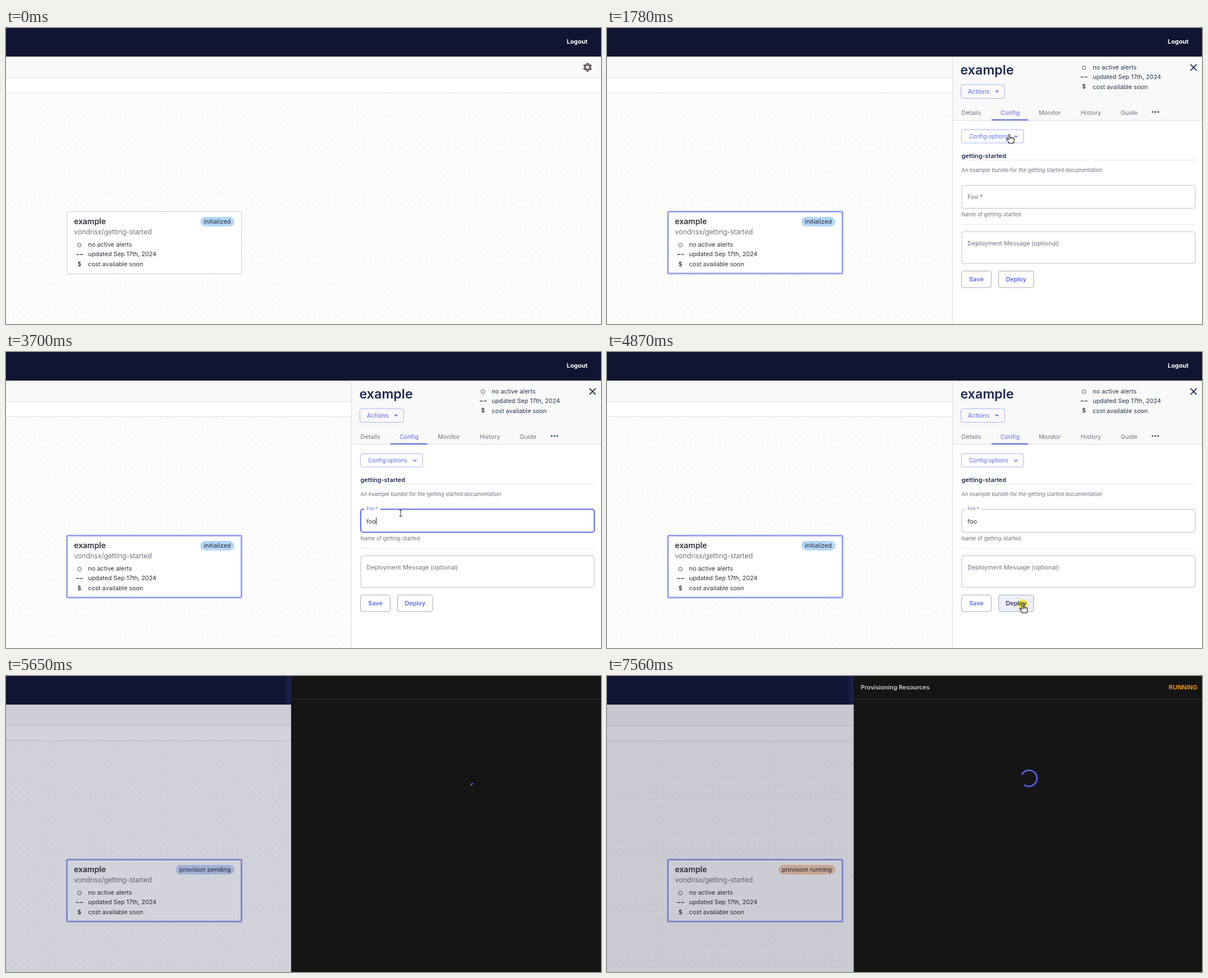
Recreate the animation shown at these times as an HTML page with a canvas. Size 1060 by 528 pixels, loop 7.61 s.

```html
<!DOCTYPE html>
<html lang="en">
<head>
<meta charset="utf-8">
<title>Deploy a bundle</title>
<style>
html, body { margin: 0; width: 100%; height: 100%; overflow: hidden; background: #fff; }
canvas { display: block; width: 1060px; height: 528px; }
</style>
</head>
<body>
<canvas id="stage" width="1060" height="528"></canvas>
<script>
const ctx = document.getElementById('stage').getContext('2d');
const W = 1060, H = 528, LOOP = 7610;
const BLUE = '#5a6af0', NAVY = '#1e2a52', GREY = '#6f7280';
const BODY = 10.85, SMALL = 9.3;

// Moments on the timeline, in ms
const CLICK_CARD = 640, PANEL = 700, FORM = 1200, FOCUS = 2320, POPUP = 2430;
const KEYS = [3100, 3370, 3530];
const CLICK_DEPLOY = 4800, SUBMIT = 5470, DRAWER = 5521, TITLE = 5960, RUNNING = 6990;

const clamp = v => Math.max(0, Math.min(1, v));
const mix = (a, b, p) => a + (b - a) * p;
const phase = (t, start, length) => clamp((t - start) / length);
const smooth = p => p * p * (3 - 2 * p);

function bezier(x1, y1, x2, y2) {
  const at = (a, b, s) => 3 * a * s * (1 - s) ** 2 + 3 * b * s * s * (1 - s) + s ** 3;
  return p => {
    let low = 0, high = 1;
    for (let i = 0; i < 24; i++) {
      const mid = (low + high) / 2;
      if (at(x1, x2, mid) < p) low = mid; else high = mid;
    }
    return at(y1, y2, low);
  };
}
const easeOut = bezier(0, 0, .2, 1);
const standard = bezier(.4, 0, .2, 1);
const easeInOut = bezier(.42, 0, .58, 1);

function mixColor(a, b, p) {
  return `rgb(${a.map((v, i) => Math.round(mix(v, b[i], p)))})`;
}

function rect(x, y, w, h, color) {
  ctx.fillStyle = color;
  ctx.fillRect(x, y, w, h);
}

function box(x, y, w, h, r, fill, stroke, width = 1) {
  ctx.beginPath();
  ctx.roundRect(x, y, w, h, r);
  if (fill) { ctx.fillStyle = fill; ctx.fill(); }
  if (stroke) { ctx.strokeStyle = stroke; ctx.lineWidth = width; ctx.stroke(); }
}

function poly(points, fill, stroke, width = 1) {
  ctx.beginPath();
  points.forEach(([x, y]) => ctx.lineTo(x, y));
  if (fill) { ctx.closePath(); ctx.fillStyle = fill; ctx.fill(); }
  if (stroke) { ctx.strokeStyle = stroke; ctx.lineWidth = width; ctx.stroke(); }
}

function disc(x, y, r, color) {
  ctx.beginPath();
  ctx.arc(x, y, r, 0, 7);
  ctx.fillStyle = color;
  ctx.fill();
}

function text(str, x, y, size, color, weight = 400, align = 'left') {
  ctx.font = `${weight} ${size}px Inter, sans-serif`;
  ctx.textAlign = align;
  ctx.fillStyle = color;
  ctx.fillText(str, x, y);
}

function gear(x, y) {
  ctx.save();
  ctx.translate(x, y);
  ctx.fillStyle = '#6b6264';
  for (let i = 0; i < 6; i++) {
    ctx.rotate(Math.PI / 3);
    ctx.fillRect(-2.2, -7.8, 4.4, 5);
  }
  disc(0, 0, 5.9, '#6b6264');
  disc(0, 0, 2.7, '#f8f8f8');
  ctx.restore();
}

function drawPage() {
  rect(0, 0, W, H, '#fcfcfc');
  ctx.fillStyle = '#dfdfe2';
  for (let y = 119; y < H; y += 12.5)
    for (let x = 12; x < W; x += 12.5) ctx.fillRect(Math.round(x), Math.round(y), 1, 1);
  rect(0, 0, W, 51, '#111531');
  rect(0, 51, W, 37, '#f8f8f8');
  rect(0, 88, W, 1, '#dedede');
  rect(0, 89, W, 26, '#fff');
  rect(0, 115, W, 1, '#dedede');
  text('Logout', 1036, 28, BODY, '#fff', 700, 'right');
  gear(1036, 70);
}

function drawStatus(x, y, color) {
  ctx.beginPath();
  ctx.arc(x - 15.5, y - 2.7, 3.3, 0, 7);
  ctx.strokeStyle = '#4c4c55';
  ctx.lineWidth = 1;
  ctx.stroke();
  rect(x - 21.5, y + 13, 5.5, 2, '#777');
  rect(x - 14.5, y + 13, 5.5, 2, '#777');
  text('$', x - 15.5, y + 34.5, 10, '#333', 600, 'center');
  text('no active alerts', x, y, BODY, color);
  text('updated Sep 17th, 2024', x, y + 17.3, BODY, color);
  text('cost available soon', x, y + 35, BODY, color);
}

function drawBadge(t) {
  const blue = [179, 215, 248], purple = [228, 210, 252], orange = [250, 207, 172];
  let label = 'initialized', color = mixColor(blue, blue, 0);
  if (t >= RUNNING) {
    label = 'provision running';
    color = mixColor(purple, orange, phase(t, RUNNING, 300));
  } else if (t >= SUBMIT) {
    label = 'provision pending';
    color = mixColor(blue, purple, phase(t, SUBMIT + 90, 300));
  }
  ctx.font = `400 ${BODY}px Inter, sans-serif`;
  const w = ctx.measureText(label).width + 12.5;
  box(406.7 - w, 337, w, 17, 8.5, color);
  text(label, 400.4, 349.3, BODY, '#26262e', 400, 'right');
}

function drawCard(t) {
  if (t < CLICK_CARD) box(108.5, 327.5, 311, 111, 2, '#fff', '#c9c9c9');
  else box(108.5, 327.5, 311, 110.5, 2, '#fff', '#98a4f2', 3);
  text('example', 121, 350, 13.95, '#33333b', 600);
  text('vondrisx/getting-started', 121, 368, 12.4, '#4a4a52', 300);
  drawStatus(146.3, 390, '#2f2f37');
  drawBadge(t);
}

function drawField(t, pos) {
  const focused = t >= FOCUS && t < CLICK_DEPLOY;
  const hovered = inside(pos, 631, 280, 1048, 322);
  const shrink = standard(phase(t, FOCUS, 200));
  const border = focused ? BLUE : hovered ? '#30333f' : '#bdbdbf';
  const thick = focused ? 2 : 1;
  box(632, 280.5, 416, 41, 4, '#fff', border, thick);
  if (shrink > 0) rect(638, 279, 29 * shrink, 3, '#fff');
  text('Foo *', 642.3, mix(305.3, 282, shrink), mix(BODY, 8.1, shrink), focused ? BLUE : GREY);

  const typed = KEYS.filter(k => t >= k).length;
  text('foo'.slice(0, typed), 642.3, 305.5, BODY, '#33343f');
  const lastKey = typed ? KEYS[typed - 1] : FOCUS + 30;
  if (focused && (t - lastKey) % 1000 < 500) {
    rect(Math.round(642 + ctx.measureText('foo'.slice(0, typed)).width), 295, 1, 13, '#222');
  }
}

function drawButton(label, x, w, hovered) {
  box(x, 433.5, w, 29.5, 4, hovered ? '#eeeffe' : '#fff', '#a8a8ad');
  text(label, x + w / 2, 452, BODY, hovered ? '#3d3f5c' : BLUE, 600, 'center');
}

function drawForm(t, pos) {
  const sent = t >= SUBMIT;
  ctx.save();
  if (sent) ctx.translate(0, -33.3);
  else {
    box(631.5, 181.5, 110.5, 23.5, 3, '#fff', '#a7b1f5');
    text('Config options', 645, 197, 10.08, BLUE);
    poly([[725.3, 192], [728.3, 195], [731.3, 192]], null, BLUE, 1.3);
  }
  text('getting-started', 631.5, 231.6, BODY, NAVY, 600);
  rect(631, 235, 417, 1, '#e4e4e6');
  text('An example bundle for the getting started documentation', 631.5, 256.6, SMALL, GREY);
  drawField(t, pos);
  text('Name of getting-started', 631.5, 336.2, SMALL, GREY);
  rect(631, 350, 417, 1, '#e6e6e8');
  const overMessage = inside(pos, 631, 363, 1048, 420);
  box(632, 363.5, 416, 56.5, 4, '#fff', overMessage ? '#30333f' : '#bdbdbf');
  text('Deployment Message (optional)', 642.3, 387.8, BODY, GREY);
  drawButton('Save', 631.5, 53, false);
  drawButton('Deploy', 697.5, 62.5, inside(pos, 697, 433, 760, 463));
  ctx.restore();
}

function drawPanel(t, pos) {
  if (t < PANEL) return;
  ctx.save();
  ctx.beginPath();
  ctx.rect(0, 51, W, H);
  ctx.clip();
  ctx.translate(445 * (1 - easeOut(phase(t, PANEL, 225))), 0);
  rect(615, 51, 445, 477, '#fff');
  rect(615, 51, 445, 114, '#f9f9fa');
  rect(615, 51, 1, 477, '#dcdce0');
  rect(615, 164.5, 445, 1, '#dcdce0');
  text('example', 629.6, 83, 23.25, NAVY, 600);
  box(630.5, 101, 78, 24.5, 4, null, '#a7b1f5');
  text('Actions', 643, 117, BODY, BLUE);
  poly([[691.5, 111.7], [698, 111.7], [694.7, 115.2]], BLUE);
  drawStatus(865.3, 73.5, '#2c3350');
  poly([[1039.5, 64.8], [1050.5, 75.8]], null, NAVY, 1.8);
  poly([[1050.5, 64.8], [1039.5, 75.8]], null, NAVY, 1.8);
  const tabs = { Details: 649, Config: 718, Monitor: 789, History: 862, Guide: 930 };
  for (const [name, x] of Object.entries(tabs))
    text(name, x, 154.5, BODY, name === 'Config' ? BLUE : GREY, 400, 'center');
  rect(685, 163, 65.5, 1.8, '#4a5dd0');
  for (let i = -1; i < 2; i++) disc(977 + i * 5, 149.8, 1.7, '#5f6480');
  if (t >= FORM) drawForm(t, pos);
  ctx.restore();
}

function drawPopup(t) {
  const alpha = phase(t, POPUP, 60) * (1 - phase(t, 3560, 140));
  if (!alpha) return;
  ctx.globalAlpha = alpha;
  poly([[718.5, 329.5], [725, 323], [731.5, 329.5]], '#1f1f1f');
  box(709, 329, 121.5, 34.5, 4, '#1f1f1f');
  text('foo', 718, 350, 10, '#f1f1f1', 600);
  ctx.globalAlpha = 1;
}

function drawSpinner(x, y, elapsed) {
  const cycle = (elapsed % 1400) / 1400, around = 126.92, turn = 2 * Math.PI;
  const grow = easeInOut(clamp(cycle * 2)), shift = easeInOut(clamp(cycle * 2 - 1));
  const start = 15 * grow + 110 * shift;
  const end = Math.min(around, start + mix(1, 100, grow));
  const spin = cycle * turn;
  ctx.beginPath();
  ctx.arc(x, y, 14.3, spin + start / around * turn, spin + end / around * turn);
  ctx.strokeStyle = '#5765e8';
  ctx.lineWidth = 2.6;
  ctx.stroke();
}

function drawDrawer(t) {
  if (t < DRAWER) return;
  const p = phase(t, DRAWER, 225);
  rect(0, 0, W, H, `rgba(19,19,63,${.215 * standard(p)})`);
  const x = mix(W, 439.5, easeOut(p));
  const glow = ctx.createLinearGradient(x - 14, 0, x, 0);
  glow.addColorStop(0, 'rgba(60,75,125,0)');
  glow.addColorStop(1, 'rgba(60,75,125,.3)');
  rect(x - 14, 0, 14, 51, glow);
  rect(x, 0, W - x + 1, H, '#151515');
  rect(x, 41, W - x + 1, 1, '#333');
  drawSpinner(x + 312.2, 182.5, t - DRAWER);
  if (t < TITLE) return;
  text('Provisioning Resources', x + 12.5, 24.2, BODY, '#cfcfcf', 600);
  const running = t >= RUNNING;
  text(running ? 'RUNNING' : 'PENDING', 1051.7, 24.2, BODY, running ? '#ffa012' : '#fff212', 600, 'right');
}

// Pointer path: time, x, y
const PATH = [
  [50, 430, 540], [480, 322, 406], [830, 322, 406], [960, 472, 385], [1200, 690, 250],
  [1500, 722, 150], [1620, 722, 150], [2070, 703, 287], [4220, 703, 287],
  [4750, 740, 450], [5050, 740, 450], [5400, 860, 545]
];

function pointerAt(t) {
  const next = PATH.findIndex(k => k[0] > t);
  if (next < 1) return [-99, -99];
  const [t0, x0, y0] = PATH[next - 1], [t1, x1, y1] = PATH[next];
  const p = smooth((t - t0) / (t1 - t0));
  return [mix(x0, x1, p), mix(y0, y1, p)];
}

function inside([x, y], left, top, right, bottom) {
  return x > left && x < right && y > top && y < bottom;
}

// A hand is a set of finger strokes, outlined in black and filled in white
function drawHand(fingers, palm) {
  ctx.lineCap = 'round';
  for (const [color, extra] of [['#111', 2], ['#fff', 0]]) {
    fingers.forEach(([x1, y1, x2, y2]) => poly([[x1, y1], [x2, y2]], null, color, 1.7 + extra));
    const [x, y, w, h] = palm, e = extra / 2;
    box(x - e, y - e, w + extra, h + extra, 3, color);
  }
  ctx.lineCap = 'butt';
}
const OPEN_HAND = [[-4, -3.5, -2.5, 1], [-1.5, -5.3, -.8, 0], [1.4, -5.3, 1.2, 0], [4.4, -3.5, 3.6, 1], [-5.6, 1.2, -2.5, 4]];
const LINK_HAND = [[0, 1, 0, 9], [2.8, 6, 2.8, 10], [5.4, 6.5, 5.4, 10], [7.8, 7.5, 7.6, 11], [-3.6, 8.5, -.5, 12]];

function drawPointer(t, pos) {
  for (const click of [CLICK_CARD, FOCUS, CLICK_DEPLOY]) {
    const age = t - click;
    if (age < 0 || age > 180) continue;
    ctx.globalCompositeOperation = 'multiply';
    disc(...pos, 9, 'rgba(255,242,20,.75)');
    ctx.globalCompositeOperation = 'source-over';
  }
  ctx.save();
  ctx.translate(...pos);
  const link = inside(pos, 620, 135, 1000, 165) || inside(pos, 631, 181, 742, 205) ||
    inside(pos, 697, 433, 760, 463);
  const edit = inside(pos, 631, 280, 1048, 322) || inside(pos, 631, 363, 1048, 420);
  if (pos[0] < 615) drawHand(OPEN_HAND, [-3.2, -.5, 7, 7]);
  else if (link) drawHand(LINK_HAND, [-.8, 8.5, 8.8, 6.5]);
  else if (edit) {
    rect(-.5, -5, 1, 11, '#222');
    rect(-2.5, -5.5, 5, 1, '#222');
    rect(-2.5, 5.5, 5, 1, '#222');
  } else {
    ctx.beginPath();
    ctx.lineJoin = 'round';
    poly([[0, 0], [0, 13], [3, 10.3], [5, 15], [7, 14], [5, 9.6], [9, 9.3], [0, 0]], '#fff', '#111');
  }
  ctx.restore();
}

function draw(t) {
  const pos = pointerAt(t);
  drawPage();
  drawCard(t);
  drawPanel(t, pos);
  drawPopup(t);
  drawPointer(t, pos);
  drawDrawer(t);
}

const began = performance.now();
function tick() {
  draw((performance.now() - began) % LOOP);
  requestAnimationFrame(tick);
}
tick();
</script>
</body>
</html>
```
